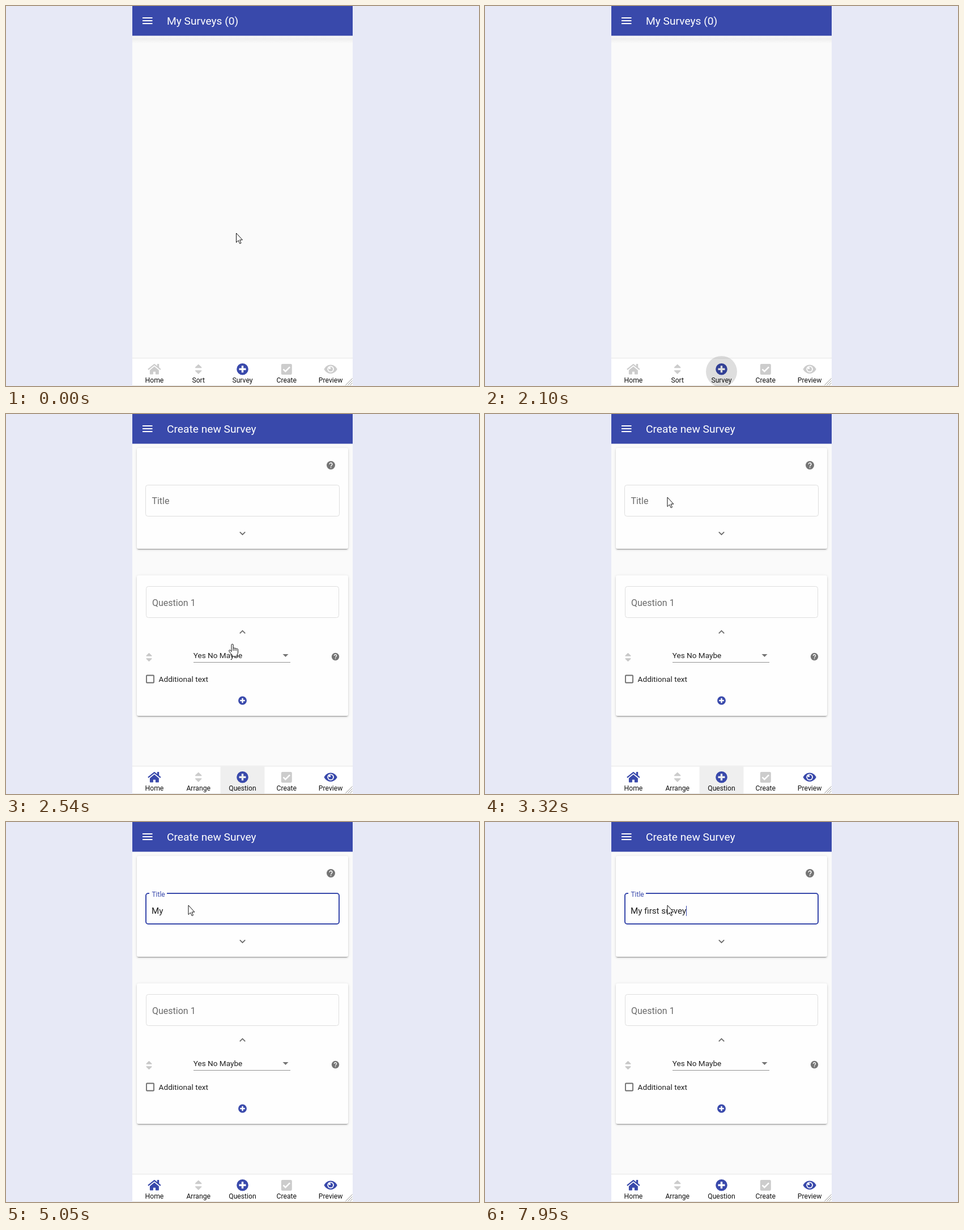
Animation, 835 px wide and 671 px high, one loop 8000 ms. Source, as an HTML page:

```html
<!DOCTYPE html>
<html lang="en">
<head>
<meta charset="utf-8">
<title>Survey builder</title>
<style>
  html, body { margin: 0; width: 100%; height: 100%; overflow: hidden; background: #e7e9f6; }
  body { position: relative; font-family: Roboto, sans-serif; }
  svg, .panel, .card, .entry { position: absolute; }
  svg { left: 0; top: 0; width: 835px; height: 671px; }
  .panel { left: 223px; top: 0; width: 389px; height: 671px; background: #fafafa; }
  .card {
    left: 231px; width: 373px; background: #fefefe; border-radius: 3px;
    box-shadow: 0 3px 1px -2px rgba(0,0,0,.2), 0 2px 2px rgba(0,0,0,.14), 0 1px 5px rgba(0,0,0,.12);
  }
  .entry {
    left: 257px; top: 148px; height: 18px; line-height: 18px;
    font-size: 15.2px; white-space: pre; color: #212121;
  }
  .caret { position: absolute; right: -1px; top: 0; width: 1px; height: 18px; background: #3949ab; }
  .nav { font-size: 12.2px; text-anchor: middle; fill: #111; }
  .heading { font-size: 19.2px; fill: #fff; }
  .label { font-size: 16px; fill: #6b6b6b; }
  .option { font-size: 13.6px; fill: #212121; }
  .line { fill: none; stroke: #6b6b6b; stroke-width: 1.8; }
  .box { fill: none; stroke: #dedede; }
</style>
</head>
<body>
<div class="panel"></div>
<div id="cards">
  <div class="card" style="top:60px;height:178px"></div>
  <div class="card" style="top:285px;height:248px"></div>
</div>

<svg viewBox="0 0 835 671">
  <defs>
    <linearGradient id="fade" x2="0" y2="1">
      <stop offset="0" stop-color="#f8f8f8"/>
      <stop offset=".4" stop-color="#efefef"/>
      <stop offset="1" stop-color="#fafafa"/>
    </linearGradient>
    <g id="home">
      <path d="M-11 .7 0-8 11 .7" fill="none" stroke="currentColor" stroke-width="2.2" stroke-linejoin="round"/>
      <path d="M-8 2 0-4.6 8 2V8.6q0 .7-.7.7H2.7q-.7 0-.7-.7V4.6H-2v4q0 .7-.7.7H-7.3q-.7 0-.7-.7zM5-9.3H8.3V-1.4L5-4z" fill="currentColor"/>
    </g>
    <path id="sort" d="M-5 -2.8H5L0 -7.7zM-5 2.8H5L0 7.7z" fill="currentColor" stroke="currentColor" stroke-width="1.6" stroke-linejoin="round"/>
    <path id="plus" fill="currentColor" fill-rule="evenodd" d="M-10.3 0a10.3 10.3 0 1 0 20.6 0a10.3 10.3 0 1 0-20.6 0zM-1.7-6h3.4v4.3H6v3.4H1.7V6h-3.4V1.7H-6v-3.4h4.3z"/>
    <g id="check">
      <rect x="-9.5" y="-9.3" width="19" height="19" rx="2.2" fill="currentColor"/>
      <path d="M-5.8.2-2 4 5.8-3.8" fill="none" stroke="#fff" stroke-width="2.6"/>
    </g>
    <g id="eye">
      <path d="M-11.6 0C-9.4-4.6-5-7.8 0-7.8S9.4-4.6 11.6 0C9.4 4.6 5 7.8 0 7.8S-9.4 4.6-11.6 0z" fill="currentColor"/>
      <circle r="5.8" fill="#fff"/>
      <circle r="4" fill="currentColor"/>
      <circle cx="-1.7" cy="-1.7" r="1.8" fill="#fff"/>
    </g>
    <g id="help">
      <circle r="7.5" fill="#757575"/>
      <path d="M-2.3-1.8a2.3 2.3 0 1 1 3.9 1.6Q0 .9 0 2.1" fill="none" stroke="#fff" stroke-width="1.5"/>
      <rect x="-.8" y="3.2" width="1.6" height="1.6" fill="#fff"/>
    </g>
  </defs>

  <path d="M223 0h389v52.5H223z" fill="#3949ab"/>
  <path d="M241 20h17.5v2H241zm0 5h17.5v2H241zm0 5h17.5v2H241z" fill="#fff"/>
  <path d="M223 621h389v2H223z" fill="#ececec"/>
  <path d="M223 622.5h389V670H223z" fill="#fff"/>
  <path d="M223 670h389v1H223z" fill="#dedede"/>

  <g id="listPage">
    <text class="heading" x="284" y="32.7">My Surveys (0)</text>
    <path d="M223 53h389v13H223z" fill="url(#fade)"/>
    <g id="listNav" class="nav"></g>
    <circle id="ripple" cx="417.5" cy="645.5" fill="#000" opacity=".13"/>
  </g>

  <g id="formPage">
    <text class="heading" x="284" y="32.7">Create new Survey</text>
    <path id="pressed" d="M378.5 622.5h78V670h-78z" fill="#efefef"/>
    <g id="formNav" class="nav"></g>

    <use href="#help" x="573.5" y="90.5"/>
    <rect id="titleBox" class="box" x="246.5" y="125.5" width="342" height="55" rx="4"/>
    <path id="titleFocus" d="M284 126H584a4 4 0 0 1 4 4V176a4 4 0 0 1-4 4H251a4 4 0 0 1-4-4V130a4 4 0 0 1 4-4h2" fill="none" stroke="#3949ab" stroke-width="2"/>
    <text id="titleLabel" class="label">Title</text>
    <path class="line" d="M412.8 208.4l4.7 4.6 4.7-4.6"/>

    <rect class="box" x="247.5" y="304.5" width="340" height="55" rx="4"/>
    <text class="label" x="258" y="338.5">Question 1</text>
    <path class="line" d="M412.8 387.3l4.7-4.6 4.7 4.6"/>
    <use href="#sort" transform="translate(252.5 429.5) scale(.88)" color="#c8c8c8"/>
    <text class="option" x="330.7" y="431">Yes No Maybe</text>
    <path d="M331 438.5h171" stroke="#929292"/>
    <path d="M488.5 424h10l-5 5z" fill="#757575"/>
    <use href="#help" transform="translate(581.5 428.5) scale(.89)"/>
    <rect class="line" x="248" y="461.5" width="13" height="13" rx="1"/>
    <text class="option" x="269.6" y="472.7">Additional text</text>
    <use href="#plus" transform="translate(417.5 506) scale(.72)" color="#3949ab"/>
  </g>

  <path d="M599.5 669.5l12-12m-8 12l8-8m-4 8l4-4" stroke="#8a8a8a" stroke-width=".9"/>
</svg>

<div class="entry" id="entry"><span id="typed"></span><i class="caret" id="caret"></i></div>

<svg viewBox="0 0 835 671">
  <g id="cursor" fill="#fff" stroke="#111" stroke-linejoin="round">
    <path id="arrow" d="M.5 0V16.5L4.2 13 6.7 18.6 9 17.6 6.6 12H11.4z"/>
    <path id="hand" d="M0 13.6V1.9a1.6 1.6 0 0 1 3.2 0V8a1.5 1.5 0 0 1 2.9.4a1.5 1.5 0 0 1 2.8.8a1.4 1.4 0 0 1 2.6 1V15q0 2-1.5 3.8V22H1.6V20Q-1.4 17-4 13.2q-1.2-2 .8-2.5Q-1.6 10.700 0 13.600zM3.2 8v4M6.100 8.600v3.400M8.900 9.600V12"/>
  </g>
</svg>

<script>
const LOOP = 8000, OPEN_FORM = 2200, FOCUS = 3540;
const BLUE = '#3949ab', GREY = '#ccc';
const $ = id => document.getElementById(id);
const show = (id, on) => { $(id).style.display = on ? '' : 'none'; };
const latest = (steps, t) => steps.reduce((found, step) => step[0] <= t ? step : found, steps[0]);

// time, x, y of the hotspot, pointer shape
const pointer = [
  [0, 406, 401, 'arrow'], [520, 406, 405, 'arrow'], [640, 406, 422, 'arrow'],
  [750, 408, 450, 'arrow'], [870, 418, 516, 'arrow'], [980, 429, 556, 'arrow'],
  [1100, 434, 620, 'arrow'], [1220, 426, 639, 'hand'], [1320, 416, 643, 'hand'],
  [1440, 418, 645, 'hand'], [1990, 418, 645, 'none'], [2310, 416, 590, 'hand'],
  [2420, 408, 500, 'hand'], [2540, 398, 406, 'hand'], [2660, 380, 330, 'arrow'],
  [2760, 358, 255, 'arrow'], [2880, 338, 195, 'arrow'], [2990, 326, 160, 'arrow'],
  [3100, 321.5, 147, 'arrow']
];

// time, number of characters typed
const TITLE = 'My first survey';
const typing = [4290, 4510, 4740, 5280, 5500, 5620, 6070, 6190, 6310, 6620, 6830, 7050, 7390, 7510, 7950]
  .map((time, i) => [time, i + 1]);
const caretSwitch = [[0, false], [3750, true], [3960, false], [4290, true], [5050, false], [5280, true], [7730, false], [7950, true]];

const icons = ['home', 'sort', 'plus', 'check', 'eye'];
const nav = (labels, active) => labels.map((label, i) => {
  const x = 261.9 + 77.8 * i;
  const color = active.includes(icons[i]) ? BLUE : GREY;
  return `<use href="#${icons[i]}" x="${x}" y="641.2" color="${color}"/><text x="${x}" y="665.200">${label}</text>`;
}).join('');
$('listNav').innerHTML = nav(['Home', 'Sort', 'Survey', 'Create', 'Preview'], ['plus']);
$('formNav').innerHTML = nav(['Home', 'Arrange', 'Question', 'Create', 'Preview'], ['home', 'plus', 'eye']);

function drawPointer(t) {
  const [, x, y, shape] = latest(pointer, t);
  show('arrow', shape === 'arrow');
  show('hand', shape === 'hand');
  $('cursor').setAttribute('transform', `translate(${x} ${y})`);
}

function drawTitle(t) {
  const focused = t >= FOCUS;
  const p = Math.min(1, Math.max(0, (t - FOCUS) / 200));
  const ease = 1 - (1 - p) ** 2;
  const label = $('titleLabel');
  label.setAttribute('transform', `translate(257.4 ${159.2 - 27.5 * ease}) scale(${1 - .25 * ease})`);
  label.style.fill = focused ? BLUE : '';
  show('titleBox', !focused);
  show('titleFocus', focused);

  const started = t >= typing[0][0];
  const count = started ? latest(typing, t)[1] : 0;
  show('entry', t >= FOCUS + 110);
  $('typed').textContent = started ? TITLE.slice(0, count) : 'A survey about food';
  $('typed').style.color = started ? '' : '#c6c6c6';
  show('caret', latest(caretSwitch, t)[1]);
  $('caret').style.left = started ? '' : '0';
}

function draw(now) {
  const t = now % LOOP;
  const form = t >= OPEN_FORM;
  show('listPage', !form);
  show('formPage', form);
  show('cards', form);
  show('pressed', t < FOCUS);
  $('ripple').setAttribute('r', t < 1990 ? 0 : t < 2100 ? 19 : 27.5);
  drawPointer(t);
  drawTitle(t);
}

const start = performance.now();
function tick() {
  draw(performance.now() - start);
  requestAnimationFrame(tick);
}
tick();
</script>
</body>
</html>
```
